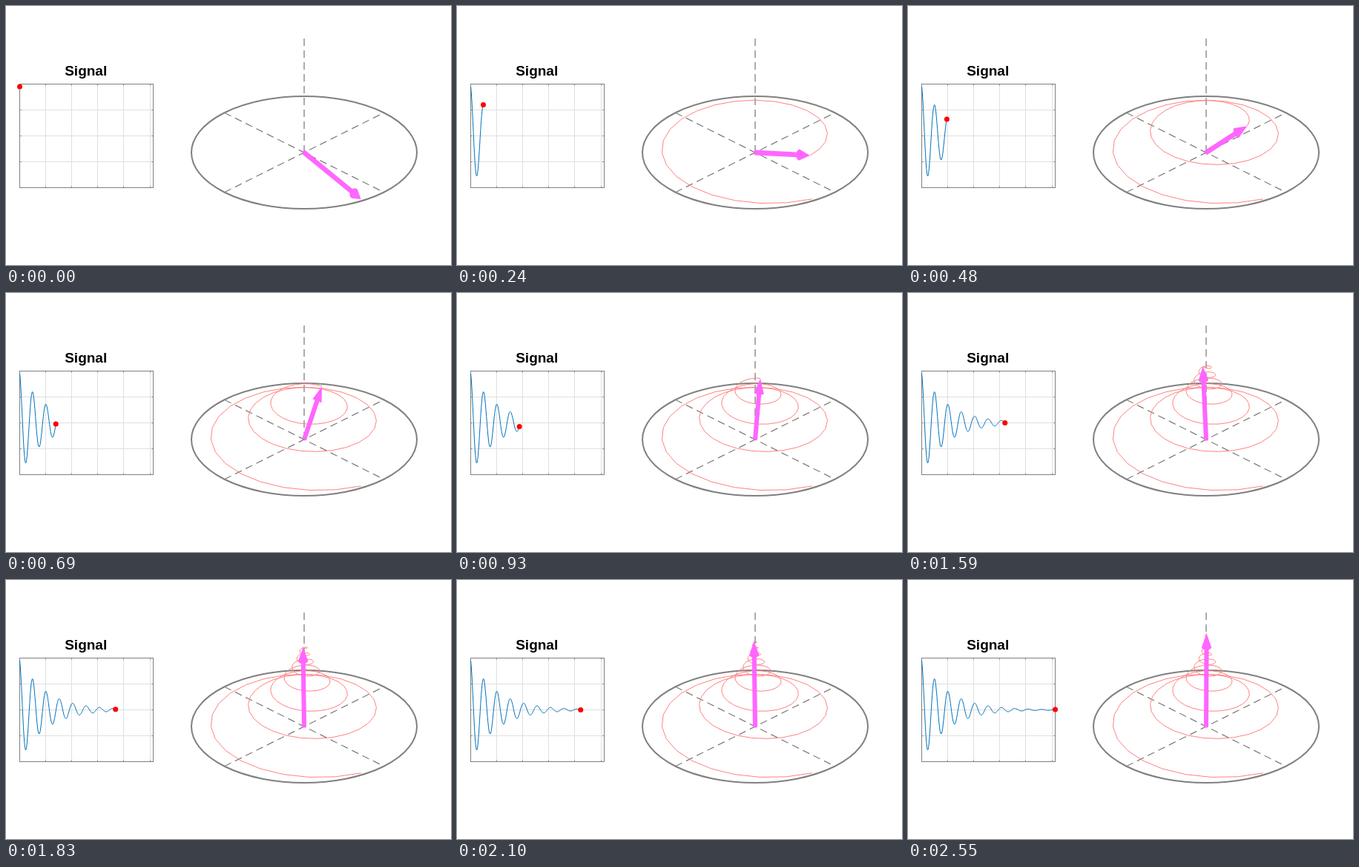
These frames come from a looping animation (600x350 px, 2580 ms). An HTML page with a canvas:

```html
<!DOCTYPE html>
<html lang="en">
<head>
<meta charset="utf-8">
<title>Signal</title>
<style>
  html, body { margin: 0; width: 100%; height: 100%; overflow: hidden; background: #fff; }
  canvas { display: block; }
</style>
</head>
<body>
<canvas id="stage" width="600" height="350"></canvas>
<script>
const ctx = document.getElementById('stage').getContext('2d');
const { PI, sin, cos, exp, hypot } = Math;

const LOOP = 2580, STEP = 30;
const T0 = 0.02, DT = 0.02, PER_STEP = 3;
const T1 = 3, T2 = 1, TURNS = 1.954;
const PLOT = { x: 18.5, y: 105.5, w: 180, h: 140 };
const UNIT = PLOT.w / 5.1;
const MID = PLOT.y + PLOT.h / 2;
const GRAY = '#808080';

// Decaying precession about the vertical axis
function spin(t) {
  const r = exp(-t / T2), a = PI / 4 + 2 * PI * TURNS * t;
  return [r * cos(a), r * sin(a), 1 - exp(-t / T1)];
}

const project = ([p, q, z]) => [402 + 152 * p, 198 + 76 * q - 154 * z];

const signal = t => [
  PLOT.x + UNIT * (t - T0),
  MID - PLOT.h / 2 * exp(-t / T2) * cos(2 * PI * TURNS * t)
];

function stroke(points, color, width, dash = []) {
  ctx.beginPath();
  points.forEach(([x, y]) => ctx.lineTo(x, y));
  ctx.strokeStyle = color;
  ctx.lineWidth = width;
  ctx.setLineDash(dash);
  ctx.stroke();
  ctx.setLineDash([]);
}

function hull(points) {
  const sorted = [...points].sort((a, b) => a[0] - b[0] || a[1] - b[1]);
  const half = list => {
    const out = [];
    for (const p of list) {
      while (out.length > 1) {
        const [a, b] = out.slice(-2);
        if ((b[0] - a[0]) * (p[1] - a[1]) - (b[1] - a[1]) * (p[0] - a[0]) > 0) break;
        out.pop();
      }
      out.push(p);
    }
    return out.slice(0, -1);
  };
  return [...half(sorted), ...half(sorted.reverse())];
}

function fillHull(points, color) {
  ctx.beginPath();
  hull(points).forEach(([x, y]) => ctx.lineTo(x, y));
  ctx.fillStyle = color;
  ctx.fill();
}

// Cylinder stem and cone head along the vector
function drawArrow(tip) {
  const len = hypot(...tip);
  const [a, b, c] = tip.map(v => v / len);
  const s = hypot(a, b);
  const n = [-b / s, a / s, 0];
  const m = [-c * n[1], c * n[0], a * n[1] - b * n[0]];
  const neck = tip.map(v => v * (1 - 0.122 / len));
  const ring = (mid, r) => Array.from({ length: 24 }, (_, i) => {
    const u = i * PI / 12;
    return project(mid.map((v, j) => v + r * (cos(u) * n[j] + sin(u) * m[j])));
  });
  const color = '#ff66ff';
  fillHull([...ring([0, 0, 0], 0.02), ...ring(neck, 0.02)], color);
  fillHull([...ring(neck, 0.043), project(tip)], color);
}

function drawPlot(times) {
  const { x, y, w, h } = PLOT, right = x + w, bottom = y + h;
  const axis = '#808080', grid = '#dfdfdf';
  const cols = [1, 2, 3, 4, 5].map(i => Math.floor(x + UNIT * (i - T0)) + 0.5);
  const rows = [1, 2, 3].map(i => y + i * h / 4);
  cols.forEach(cx => stroke([[cx, y], [cx, bottom]], grid, 1));
  rows.forEach(cy => stroke([[x, cy], [right, cy]], grid, 1));
  ctx.strokeStyle = axis;
  ctx.strokeRect(x, y, w, h);
  cols.forEach(cx => {
    stroke([[cx, y], [cx, y + 2]], axis, 1);
    stroke([[cx, bottom], [cx, bottom - 2]], axis, 1);
  });
  rows.forEach(cy => {
    stroke([[x, cy], [x + 2, cy]], axis, 1);
    stroke([[right, cy], [right - 2, cy]], axis, 1);
  });

  ctx.fillStyle = '#000';
  ctx.font = 'bold 19px "Liberation Sans", Arial, sans-serif';
  ctx.textAlign = 'center';
  ctx.fillText('Signal', 107.7, 94);

  const curve = times.map(signal);
  stroke(curve, '#0072bd', 1);
  const [dx, dy] = curve[curve.length - 1];
  ctx.beginPath();
  ctx.arc(dx, dy, 3.5, 0, 2 * PI);
  ctx.fillStyle = '#f00';
  ctx.fill();
}

function drawSpace(times) {
  const d = Math.SQRT1_2, dash = [10, 6];
  const line = (a, b) => stroke([project(a), project(b)], GRAY, 1.3, dash);
  line([-d, -d, 0], [d, d, 0]);
  line([-d, d, 0], [d, -d, 0]);
  line([0, 0, 0], [0, 0, 1]);
  ctx.beginPath();
  ctx.ellipse(402, 198, 152, 76, 0, 0, 2 * PI);
  ctx.lineWidth = 2;
  ctx.strokeStyle = GRAY;
  ctx.stroke();
  const path = times.map(spin);
  stroke(path.map(project), '#ff8080', 1);
  drawArrow(path[path.length - 1]);
}

function draw(ms) {
  const step = Math.floor(ms % LOOP / STEP);
  const times = Array.from({ length: step * PER_STEP + 1 }, (_, i) => T0 + i * DT);
  ctx.fillStyle = '#fff';
  ctx.fillRect(0, 0, 600, 350);
  drawPlot(times);
  drawSpace(times);
}

const start = performance.now();
function tick() {
  draw(performance.now() - start);
  requestAnimationFrame(tick);
}
tick();
</script>
</body>
</html>
```
